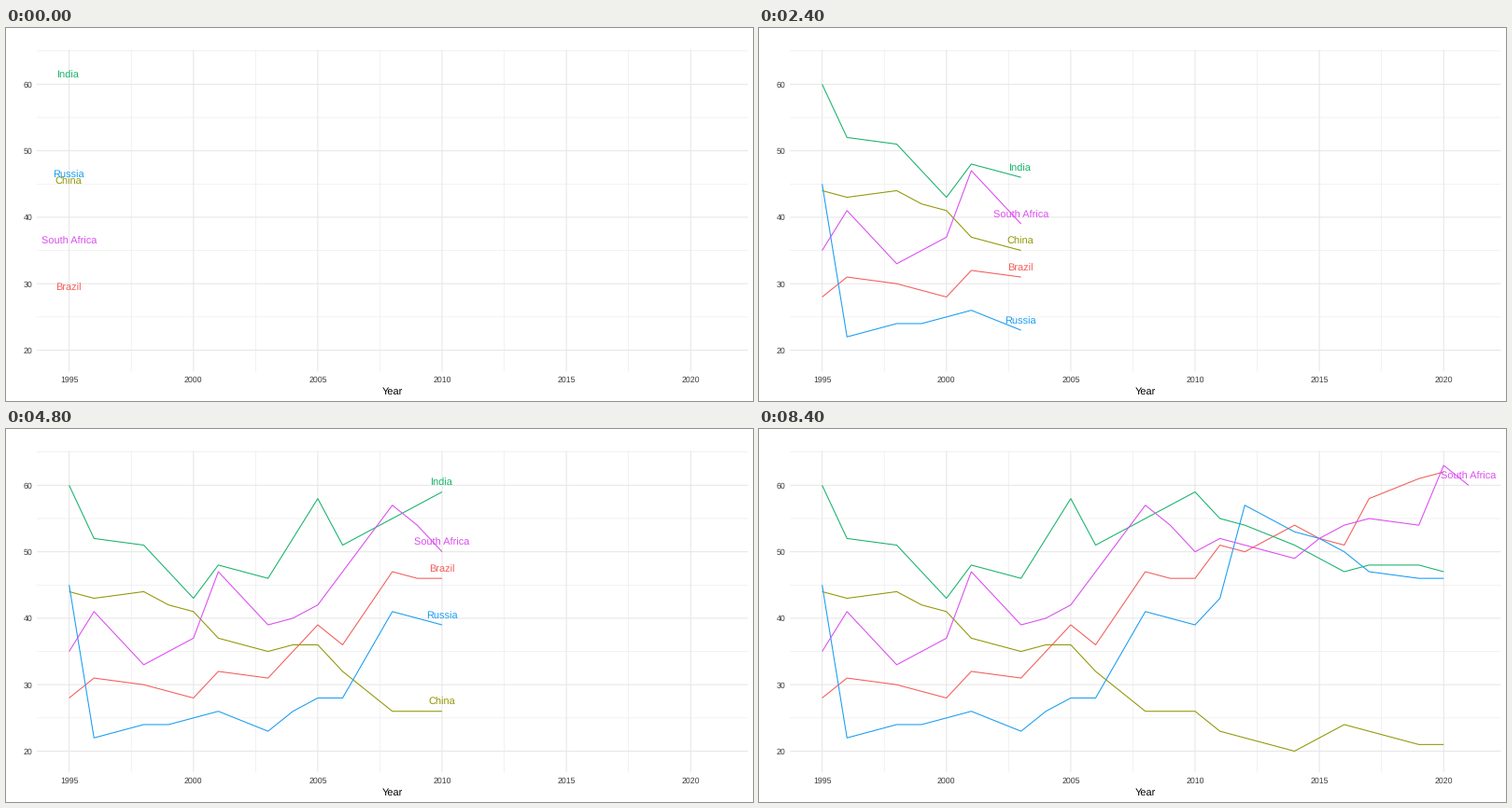
A matplotlib script that plays this animation: 800 by 400 pixels, repeating every 10 s.

```python
import matplotlib.pyplot as plt
import numpy as np
from matplotlib.animation import FuncAnimation

plt.rcParams["font.family"] = "Liberation Sans"
plt.rcParams["text.hinting"] = "none"

W, H, DPI = 800, 400, 100
PX = 72 / DPI  # points per pixel
LEFT, RIGHT, TOP, BOTTOM = 33, 794.5, 23.3, 368.3
X_MIN, X_MAX, Y_MIN, Y_MAX = 1993.7, 2022.3, 16.8, 65.2
GRID, TICK = "#E7E7E7", "#3B3B3B"
STEP_MS = 400
FRAMES = 25  # the last year is held for the remaining steps

# Years with a survey, and those whose scores anchor the lines.
YEARS = [y for y in range(1995, 2022)
         if y not in (1997, 2002, 2007, 2013, 2018)]
KEY_YEARS = [y for y in YEARS if y not in (1999, 2004, 2009, 2015)]

KEY_SCORES = {
    "Brazil": ("#F35E5A", [28, 31, 30, 28, 32, 31, 39, 36, 47,
                           46, 51, 50, 54, 51, 58, 61, 62]),
    "China": ("#929705", [44, 43, 44, 41, 37, 35, 36, 32, 26,
                          26, 23, 22, 20, 24, 23, 21, 21]),
    "India": ("#19B36B", [60, 52, 51, 43, 48, 46, 58, 51, 55,
                          59, 55, 54, 51, 47, 48, 48, 47]),
    "Russia": ("#1A9DF2", [45, 22, 24, 25, 26, 23, 28, 28, 41,
                           39, 43, 57, 53, 50, 47, 46, 46]),
    "South Africa": ("#DC4CF1", [35, 41, 33, 37, 47, 39, 42, 47, 57,
                                 50, 52, 51, 49, 54, 55, 54, 63, 60]),
}


def sx(year):
    return LEFT + (year - X_MIN) / (X_MAX - X_MIN) * (RIGHT - LEFT)


def sy(value):
    return TOP + (Y_MAX - value) / (Y_MAX - Y_MIN) * (BOTTOM - TOP)


def fill_years(keys):
    """Whole-number scores for every survey year up to the last key."""
    known = KEY_YEARS[:len(keys)]
    years = np.array([y for y in YEARS if y <= known[-1]])
    return years, np.round(np.interp(years, known, keys))


fig = plt.figure(figsize=(W / DPI, H / DPI), dpi=DPI, facecolor="white")
ax = fig.add_axes([0, 0, 1, 1])
ax.set_xlim(0, W)
ax.set_ylim(H, 0)
ax.axis("off")


def stroke(xs, ys, color, width, z):
    line, = ax.plot(xs, ys, color=color, lw=width * PX, zorder=z, snap=False,
                    solid_capstyle="butt", solid_joinstyle="round")
    return line


def write(x, y, text, size, color, ha="center"):
    return ax.text(x, y, text, fontsize=size * PX, color=color, ha=ha,
                   va="baseline", zorder=4)


def grid_x(year, width, z):
    stroke([sx(year)] * 2, [TOP, BOTTOM], GRID, width, z)


def grid_y(value, width, z):
    stroke([LEFT, RIGHT], [sy(value)] * 2, GRID, width, z)


for value in range(25, 66, 10):
    grid_y(value, 0.53, 1)
for k in range(5):
    grid_x(1997.5 + 5 * k, 0.53, 1)
for value in range(20, 61, 10):
    grid_y(value, 1.07, 2)
    write(28.05, sy(value) + 3.2, str(value), 8.8, TICK, "right")
for year in range(1995, 2021, 5):
    grid_x(year, 1.07, 2)
    write(sx(year), 379.7, str(year), 8.8, TICK)
write((LEFT + RIGHT) / 2, 393, "Year", 11, "black")

series = []
for name, (color, keys) in KEY_SCORES.items():
    line = stroke([], [], color, 1.07, 3)
    label = write(0, 0, name, 11, color)
    series.append((*fill_years(keys), line, label))


def draw(frame):
    now = YEARS[min(frame, len(YEARS) - 1)]
    artists = []
    for years, scores, line, label in series:
        seen = years <= now
        line.set_data(sx(years[seen]), sy(scores[seen]))
        label.set_visible(bool(now <= years[-1]))
        label.set_position((sx(now) - 0.4, sy(scores[seen][-1] + 1.5) + 4.3))
        artists += [line, label]
    return artists


anim = FuncAnimation(fig, draw, frames=FRAMES, interval=STEP_MS,
                     init_func=lambda: draw(0), repeat=True, repeat_delay=0)
plt.show()
```
